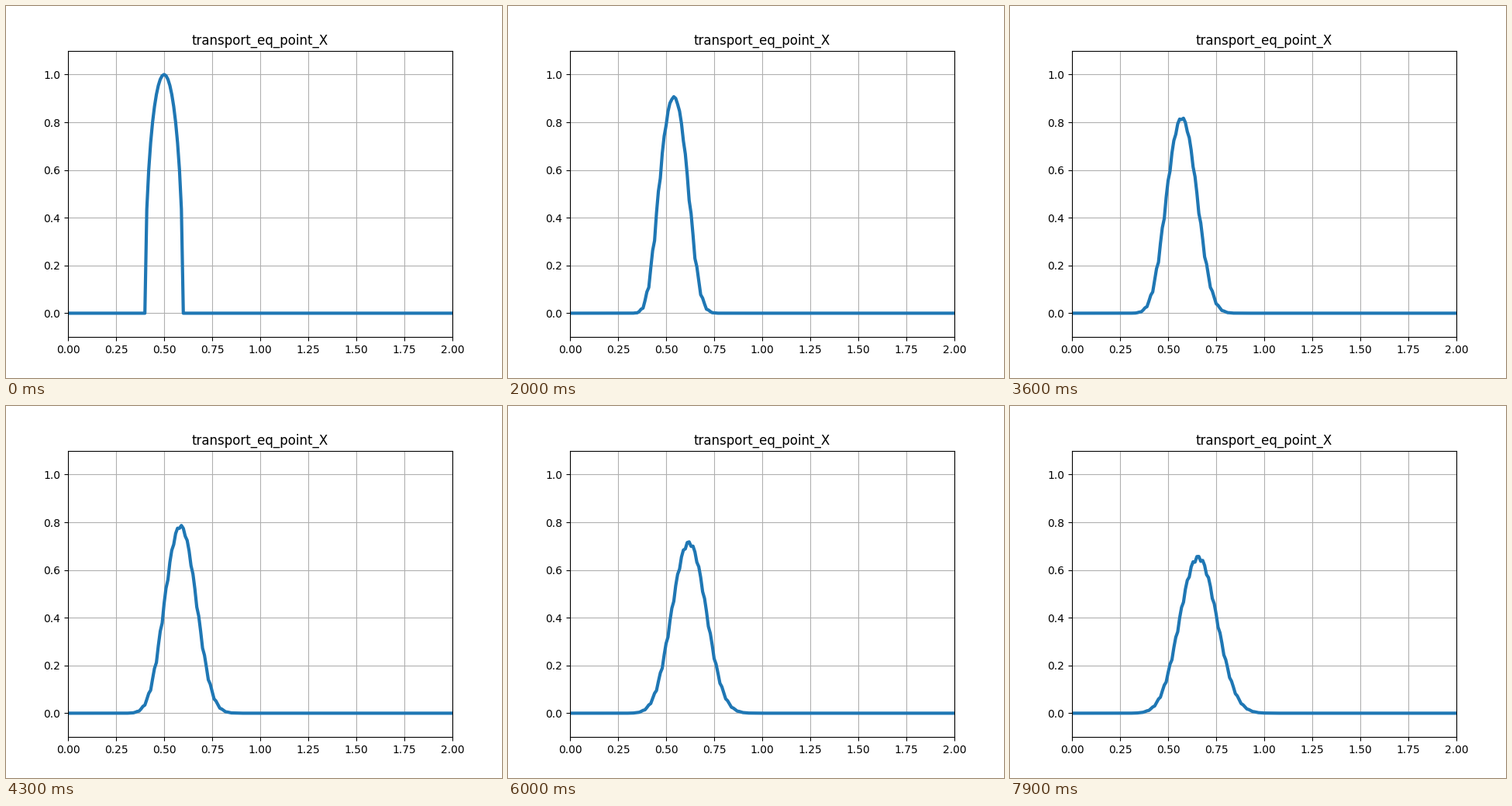
Recreate the animation shown at these times as a matplotlib script. Size 640 px wide and 480 px high, loop 8 s.

```python
import numpy as np
import matplotlib.pyplot as plt
from matplotlib.animation import FuncAnimation

FRAMES = 80
DX = 0.01
CFL = 0.2

x = np.linspace(0, 2, 201)


def pulse(shift=0.0):
    """Semi-elliptic bump of half-width 0.1 centred at 0.5 + shift."""
    r = (x - 0.5 - shift) / 0.1
    return np.sqrt(np.clip(1 - r**2, 0, None))


def solve():
    """Three-level scheme: u[n+1, i] = a * u[n, i-1] + b * u[n-1, i+1]."""
    a = (1 + 2 * CFL) / (2 + CFL)
    b = (1 - CFL) / (2 + CFL)
    u = np.zeros((FRAMES, x.size))
    u[0] = pulse()
    u[1] = pulse(CFL * DX)
    for n in range(1, FRAMES - 1):
        u[n + 1, 1:-1] = a * u[n, :-2] + b * u[n - 1, 2:]
    return u


layers = solve()

fig, ax = plt.subplots(figsize=(6.4, 4.8), dpi=100)
ax.set_title("transport_eq_point_X")
ax.set_xlim(0, 2)
ax.set_ylim(-0.1, 1.1)
ax.grid(True)
line, = ax.plot(x, layers[0], lw=3)


def update(n):
    line.set_ydata(layers[n])
    return line,


anim = FuncAnimation(fig, update, frames=FRAMES, interval=100,
                     repeat=True, repeat_delay=0)
plt.show()
```
